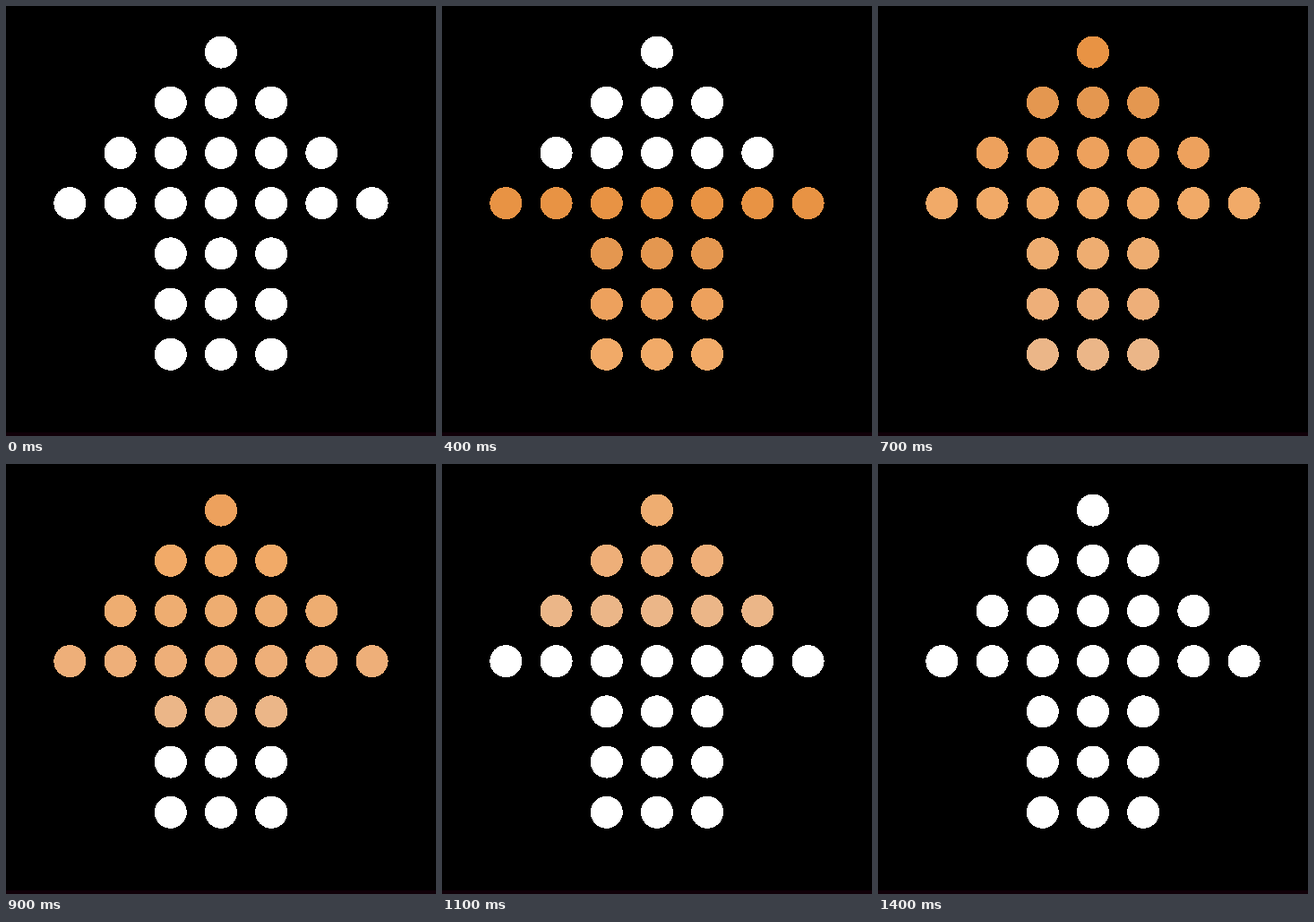
An HTML page for the animation above (1.5 s loop, 480 px wide and 480 px high).

```html
<!DOCTYPE html>
<html lang="en">
<head>
<meta charset="utf-8">
<style>
html, body { margin: 0; height: 100%; overflow: hidden; background: #000; }
svg { display: block; width: 100vw; height: 100vh; }
</style>
</head>
<body>
<svg viewBox="0 0 480 480" shape-rendering="crispEdges">
  <rect width="480" height="480"/>
  <rect y="476" width="480" height="4" fill="#100008"/>
</svg>
<script>
const NS = 'http://www.w3.org/2000/svg';
const STEP = 100, STEPS = 15, PITCH = 56.2, RADIUS = 18.05;
const ROW_SIZES = [3, 3, 3, 7, 5, 3, 1]; // bottom to top
const TINTS = ['#e89344', '#e49750', '#eda15d', '#f1aa68', '#eead71', '#eeaf79', '#ebb688'];
const svg = document.querySelector('svg');

const rows = ROW_SIZES.map((size, row) => {
  const group = svg.appendChild(document.createElementNS(NS, 'g'));
  for (let i = 0; i < size; i++) {
    const dot = group.appendChild(document.createElementNS(NS, 'circle'));
    dot.setAttribute('cx', 239.95 + (i - (size - 1) / 2) * PITCH);
    dot.setAttribute('cy', 388.75 - row * PITCH);
    dot.setAttribute('r', RADIUS);
  }
  return group;
});

// Each row runs through the tints one step after the row below it.
function draw(now) {
  const step = Math.floor(now / STEP) % STEPS;
  rows.forEach((group, row) => group.setAttribute('fill', TINTS[step - row - 1] || '#fff'));
}

const start = performance.now();
function tick() {
  draw(performance.now() - start);
  requestAnimationFrame(tick);
}
tick();
</script>
</body>
</html>
```
